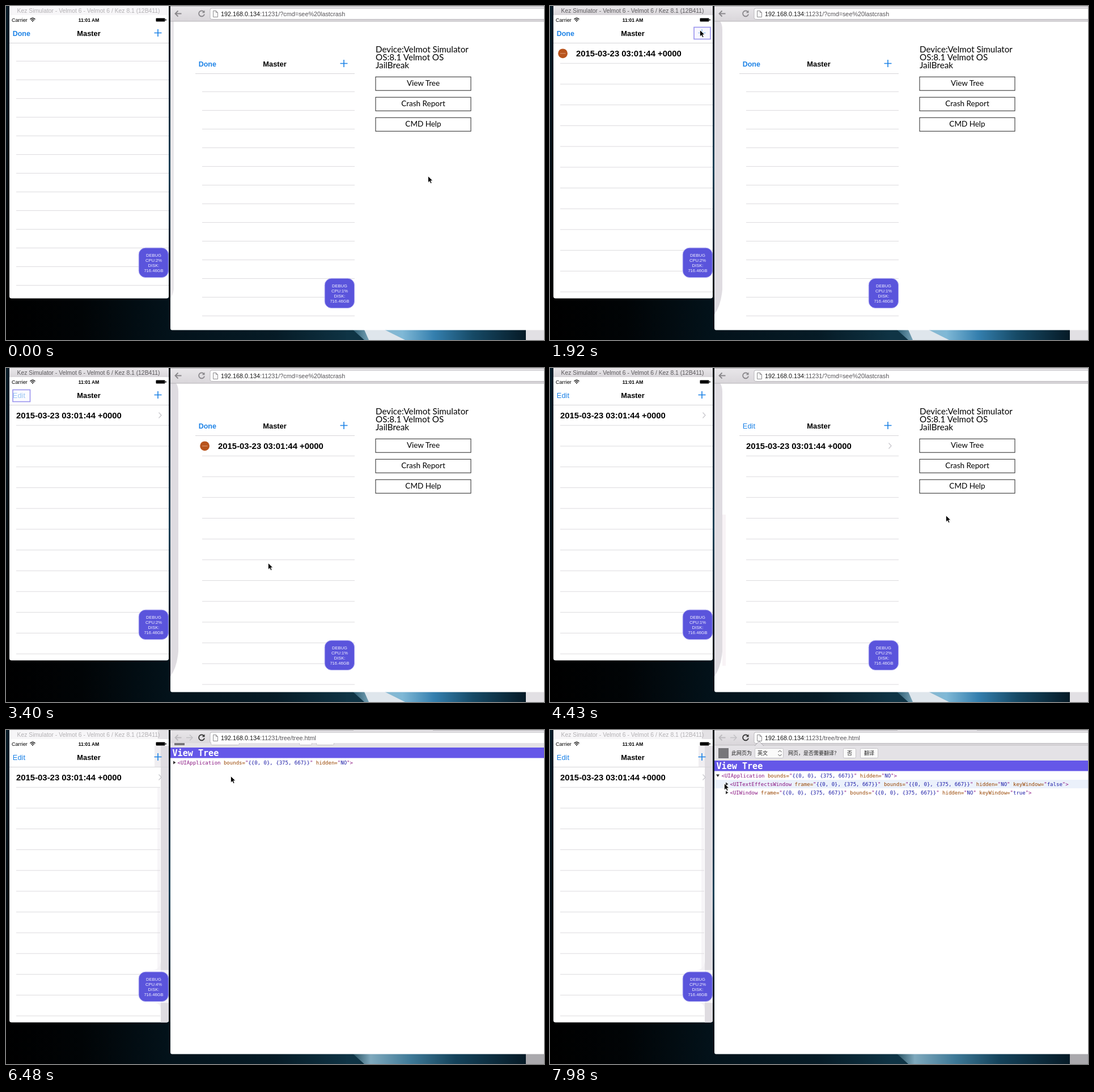
These frames come from a looping animation (949 px wide and 590 px high, 8000 ms). An HTML page:

```html
<!DOCTYPE html>
<html lang="en">
<head>
<meta charset="utf-8">
<title>Remote debugger demo</title>
<style>
html, body { margin: 0; width: 100%; height: 100%; overflow: hidden; background: #000; }
svg { display: block; width: 949px; height: 590px; font-family: "Liberation Sans", Arial, sans-serif; }
.b { font-weight: bold; }
.m { text-anchor: middle; }
.page { font-family: Lato, sans-serif; }
.mono { font-family: "DejaVu Sans Mono", monospace; }
.cjk { font-family: "Noto Sans CJK SC", "Noto Sans CJK", sans-serif; }
</style>
</head>
<body>
<svg viewBox="0 0 949 590">
  <defs>
    <linearGradient id="edge" x2="0" y2="1">
      <stop offset="0" stop-color="#061c28"/><stop offset=".6" stop-color="#020a10"/><stop offset="1" stop-color="#000"/>
    </linearGradient>
    <linearGradient id="gap" x2="0" y2="1">
      <stop offset="0" stop-color="#041018"/><stop offset=".55" stop-color="#174258"/><stop offset="1" stop-color="#03121b"/>
    </linearGradient>
    <linearGradient id="sky">
      <stop offset="0" stop-color="#000"/><stop offset=".14" stop-color="#010406"/>
      <stop offset=".3" stop-color="#03121a"/><stop offset=".5" stop-color="#061b26"/>
      <stop offset=".64" stop-color="#0f3445"/><stop offset="1" stop-color="#061a26"/>
    </linearGradient>
    <linearGradient id="dim">
      <stop offset="0" stop-color="#16404f"/><stop offset=".12" stop-color="#7fa9bd"/>
      <stop offset=".35" stop-color="#3d7896"/><stop offset=".6" stop-color="#14425a"/><stop offset="1" stop-color="#061a26"/>
    </linearGradient>
    <linearGradient id="lit">
      <stop offset="0" stop-color="#1c4c61"/><stop offset=".14" stop-color="#8db7cb"/>
      <stop offset=".3" stop-color="#7fb8d6"/><stop offset=".48" stop-color="#347fae"/>
      <stop offset=".7" stop-color="#164a66"/><stop offset="1" stop-color="#061a26"/>
    </linearGradient>
    <linearGradient id="bar" x2="0" y2="1">
      <stop offset="0" stop-color="#e9e7ea"/><stop offset="1" stop-color="#d9d6da"/>
    </linearGradient>
    <clipPath id="sim"><path d="M6 0H287V513Q287 516.5 283 516.5H10Q6 516.5 6 513Z"/></clipPath>
    <clipPath id="web"><path d="M290 0H949V572.5H293Q290 572.5 290 569Z"/></clipPath>
    <clipPath id="info"><path d="M290 23H949V60H290Z"/></clipPath>
  </defs>
  <g id="stage"></g>
</svg>
<script>
const LOOP = 8000, STEP = 147.5;
const BLUE = '#1c82e6', PURPLE = '#5a54dc';
const stage = document.getElementById('stage');

// tick, x, y of the pointer tip
const PATH = [
  [0, 745, 301], [1, 741, 292], [3, 580, 196], [5, 345, 82], [7, 265, 43], [18, 265, 43],
  [19, 140, 34], [20, 25, 46], [21, 60, 62], [22, 300, 245], [23, 463, 345], [24, 560, 330],
  [26, 656, 283], [30, 699, 261], [32, 716, 190], [34, 720, 135], [38, 720, 135],
  [41, 560, 104], [44, 397, 82], [47, 304, 78], [48, 296, 78], [50, 296, 79], [52, 306, 107],
  [53, 309, 106], [54, 308, 95]
];
// tick, percent
const CPU = [[0, 2], [3, 3], [8, 2], [17, 1], [22, 2], [28, 1], [35, 3], [42, 4], [48, 3], [54, 2]];
const WEB_CPU = [[0, 1], [29, 2], [35, 1]];

const held = (list, k) => list.filter(p => p[0] <= k).pop()[1];

function pointer(k) {
  let i = 0;
  while (i < PATH.length - 2 && PATH[i + 1][0] <= k) i++;
  const [a, x, y] = PATH[i], [b, u, v] = PATH[i + 1];
  const f = Math.min(1, (k - a) / (b - a));
  return [Math.round(x + (u - x) * f), Math.round(y + (v - y) * f)];
}

const text = (x, y, s, size, fill = '#000', cls = '') =>
  `<text x="${x}" y="${y}" font-size="${size}" fill="${fill}" class="${cls}">${s}</text>`;
const rect = (x, y, w, h, fill, more = '') =>
  `<rect x="${x}" y="${y}" width="${w}" height="${h}" fill="${fill}" ${more}/>`;
const path = (d, stroke, w = 1, fill = 'none') =>
  `<path d="${d}" stroke="${stroke}" stroke-width="${w}" fill="${fill}"/>`;
const group = (x, y, s) => `<g transform="translate(${x} ${y})">${s}</g>`;

function desktop(late) {
  const comet = rect(606, 572, 311, 18, late ? 'url(#dim)' : 'url(#lit)') +
    path('M600 572H612L632 590H600Z', 'none', 0, '#0f3445') +
    (late ? '' : path('M632 572H668L704 590H640Z', 'none', 0, '#dfe6ec'));
  return rect(0, 0, 949, 590, '#000') + rect(0, 0, 6, 517, 'url(#edge)') +
    rect(286, 0, 5, 517, 'url(#gap)') + rect(0, 516, 949, 74, 'url(#sky)') + comet +
    rect(917, 572, 32, 18, late ? '#aaa9ad' : '#e2e0e4');
}

function badge(cpu) {
  const lines = ['DEBUG', `CPU:${cpu}%`, 'DISK:', '716.46GB'];
  return rect(234.2, 427.2, 52.4, 52.4, PURPLE, 'rx="12" stroke="#aba7f1"') +
    lines.map((s, i) => text(260.5, 442.8 + i * 8.9, s, 7.6, '#f4f3ff', 'm')).join('');
}

// Navigation bar, list and badge, shared by the phone and its mirror
function list({ row, slide, edit, cpu, press, bottom, shade }) {
  const first = row ? 101.3 : 97.4, gap = row ? 36.7 : 33;
  let s = '';
  if (shade) {
    s += rect(268, 0, 19, 16, '#e4e2e5') + rect(262, 28, 25, 37, '#f0eef1') +
      rect(273, 28, 14, 489, '#dfdce1') + rect(267, 102, 5, 322, '#f7f5f8') +
      path('M273 408Q272 424 258 424H287V482H262Q273 482 273 496Z', 'none', 0, '#f4f2f5');
  }
  s += path('M6 65.5H287', '#d6d5d8');
  for (let y = first; y < bottom; y += gap) {
    const v = y.toFixed(1);
    s += path(shade ? `M18 ${v}H272M282 ${v}H287` : `M18 ${v}H287`, '#dcdbde');
  }
  const boxed = press === 'edit', plus = press === 'plus';
  if (boxed) s += rect(12, 38.5, 30.5, 21, '#fbfbff', 'stroke="#9a94ee" stroke-width="1.6"');
  if (plus) s += rect(254, 37.5, 29, 21, '#f8f7ff', 'stroke="#9a94ee" stroke-width="1.6"');
  s += edit ? text(11.8, 53, 'Edit', 12.9, boxed ? '#9cc6f3' : BLUE) : text(11.7, 53, 'Done', 12.5, BLUE, 'b');
  s += text(146, 53, 'Master', 12.9, '#000', 'm b');
  s += path('M261.5 47.5H274.5M268 41V54', plus ? '#9cc6f3' : BLUE, 1.6);
  if (row) {
    s += `<g opacity="${row}">` + text(slide, 88.8, '2015-03-23 03:01:44 +0000', 14.9, '#000', 'b');
    if (slide > 18) {
      s += group(slide - 46, 0, '<circle cx="22.6" cy="83.8" r="8.4" fill="#b8541d"/>' + path('M18 83.8H27.5', '#e2a07c'));
    }
    if (slide < 46) s += path('M269.5 78.5L274 83.5L269.5 88.5', '#c9c8cd', 1.3);
    s += '</g>';
  }
  return s + badge(cpu);
}

function phone(k) {
  const active = k >= 6 && k < 35, shade = k >= 35;
  let s = rect(6, 0, 281, 517, '#fff') + rect(6, 0, 281, 16, active ? 'url(#bar)' : '#f7f6f8');
  s += list({
    row: k < 9 ? 0 : k < 10 ? .5 : 1,
    slide: k < 21 ? 46 : k < 22 ? 30 : 18,
    edit: k >= 20,
    cpu: held(CPU, k),
    press: k >= 7 && k < 17 ? 'plus' : k >= 20 && k < 27 ? 'edit' : '',
    bottom: 516, shade
  });
  s += text(19.5, 12.2, 'Kez Simulator - Velmot 6 - Velmot 6 / Kez 8.1 (12B411)', 10.37, active ? '#5c5a5d' : '#b3b1b4');
  s += text(10, 28, 'Carrier', 9.1) + text(146, 28, '11:01 AM', 8.5, '#000', 'm b');
  s += path('M42.5 23.5Q47 19 51.5 23.5M44.3 25.4Q47 22.8 49.7 25.4', '#111', 1.4) +
    path('M45.5 26.6Q47 25.2 48.5 26.6L47 28.3Z', 'none', 0, '#111');
  s += rect(264.5, 21.5, 16, 6, '#000', 'rx="1"') + rect(281.3, 23, 1.3, 3, '#000');
  return `<g clip-path="url(#sim)">${s}</g>`;
}

function toolbar(k, url) {
  const on = k >= 35, ink = on ? '#333' : '#89878b', back = on && k < 39 ? '#333' : on ? '#bdbbbf' : '#89878b';
  let s = rect(290, 0, 659, 27, 'url(#bar)') + rect(290, 0, 659, 1, '#b3b1b5') + path('M290 27H949', '#b5b3b7');
  if (on) s += rect(613, 0, 140, 1, '#dddbdf');
  s += path('M309.5 13.5H299M303.5 8.5L298.5 13.5L303.5 18.5', back, 1.8);
  if (on) s += path('M318 13.5H328.5M324 8.5L329 13.5L324 18.5', '#c3c1c5', 1.5);
  s += path('M349 10.2A5 5 0 1 0 350 14.5', ink, 1.8) + path('M350.5 7.5V12.3H345.7Z', 'none', 0, ink);
  s += rect(360, 4, 600, 19.5, '#fff', 'rx="3" stroke="#b9b7bb"');
  s += path('M365.5 8.5H370.5L373.5 11.5V19.5H365.5ZM370.5 8.5V11.5H373.5', '#8f8e91', 1, '#fafafa');
  return s + text(379, 17.6, `<tspan fill="#111">192.168.0.134</tspan>:11231/${url}`, 10.8, '#555357');
}

function home(k) {
  let s = rect(290, 27, 659, 546, '#fff');
  if (k < 9) s += path('M290 27H296V500Q295 510 290 516Z', 'none', 0, '#e9e7ea');
  else if (k < 35) s += path('M290 27H300Q304 32 304 42V500Q302 528 290 545Z', 'none', 0, '#dfdce1');
  if (k >= 27 && k < 35) s += rect(304, 259, 6, 267, '#f8f3f6');
  s += group(328, 54, list({
    row: k >= 15 ? 1 : 0, slide: k < 27 ? 46 : 18, edit: k >= 27, cpu: held(WEB_CPU, k), bottom: 509
  }));
  ['Device:Velmot Simulator', 'OS:8.1 Velmot OS', 'JailBreak'].forEach((t, i) => {
    s += text(652, 81.8 + i * 14.2, t, 15.2, '#000', 'page');
  });
  ['View Tree', 'Crash Report', 'CMD Help'].forEach((t, i) => {
    s += rect(652, 125.2 + i * 36, 168, 24, '#fff', 'stroke="#222"') +
      text(736, 141.3 + i * 36, t, 13.5, '#000', 'page m');
  });
  return s;
}

const SIZE = '{{0, 0}, {375, 667}}';
const node = (x, y, tag, attrs) => text(x, y, `&lt;${tag}` + attrs.map(([n, v]) =>
  ` <tspan fill="#994500">${n}=</tspan>"<tspan fill="#1a1aa6">${v}</tspan>"`).join('') + '&gt;', 9.03, '#881280', 'mono');
const fold = (x, y, open) =>
  path(open ? `M${x - 3} ${y - 2}H${x + 3}L${x} ${y + 2.5}Z` : `M${x - 2} ${y - 3}V${y + 3}L${x + 2.5} ${y}Z`, 'none', 0, '#333');

function translateBar(drop) {
  const box = (x, w) => rect(x + .5, 32.5, w, 17, '#fafafa', 'rx="2" stroke="#c6c4c8"');
  const label = (x, t) => text(x, 44.3, t, 9, '#222', 'cjk');
  const s = rect(290, 28, 659, 26, '#e4e2e6') + rect(297, 32, 18, 18, '#77767a') +
    label(320, '此网页为') + box(361, 50) + label(366, '英文') +
    path('M402.5 39L405.5 36L408.5 39M402.5 43L405.5 46L408.5 43', '#444') +
    label(420, '网页，是否需要翻译？') + box(517, 22) + label(524, '否') + box(547, 31) + label(554, '翻译');
  return `<g clip-path="url(#info)">${group(0, drop - 27, s)}</g>`;
}

const barDrop = k => k < 44 ? 0 : k < 45 ? 4 : k < 46 ? 16 : 27;

function tree(k, y) {
  const top = 27 + barDrop(k), open = k >= 49;
  let s = rect(290, 27, 659, 546, '#fff');
  const hover = k >= 47 ? Math.floor((y - top - 19) / 15) : -1;
  if (hover >= 0 && hover < (open ? 3 : 1)) s += rect(290, top + 19 + hover * 15, 659, 15, '#ebf1fb');
  s += rect(290, top, 659, 18.5, '#6557e8') + text(293.5, top + 15, 'View Tree', 15.1, '#fff', 'mono b');
  s += fold(open ? 296 : 297, top + 26.5, open) +
    node(302.5, top + 29.5, 'UIApplication', [['bounds', SIZE], ['hidden', 'NO']]);
  if (open) {
    [['UITextEffectsWindow', 'false'], ['UIWindow', 'true']].forEach(([tag, key], i) => {
      const v = top + 41.5 + i * 15;
      s += fold(312, v, false) +
        node(317.5, v + 3, tag, [['frame', SIZE], ['bounds', SIZE], ['hidden', 'NO'], ['keyWindow', key]]);
    });
  }
  return s;
}

function browser(k, y) {
  const isTree = k >= 40;
  let s = (isTree ? tree(k, y) : home(k)) + toolbar(k, isTree ? 'tree/tree.html' : '?cmd=see%20lastcrash');
  if (k >= 44) {
    s += translateBar(barDrop(k));
    if (k >= 46) s += path('M361 28L369 20L377 28', '#a9a7ab', 1, '#e4e2e6');
  }
  return `<g clip-path="url(#web)">${s}</g>`;
}

function draw(k) {
  const [x, y] = pointer(k);
  const arrow = path('M0 0V11.5L2.7 9L4.6 13L6.6 12L4.8 8.2H8.4Z', '#fff', .8, '#000');
  stage.innerHTML = desktop(k >= 35) + phone(k) + browser(k, y) + group(x - .5, y - .5, arrow);
}

let shown = -1;
const start = performance.now();
function frame(now) {
  const t = Math.max(0, now - start) % LOOP;
  const k = Math.floor(t / STEP + .1);
  if (k !== shown) draw(shown = k);
  requestAnimationFrame(frame);
}
draw(0);
requestAnimationFrame(frame);
</script>
</body>
</html>
```
